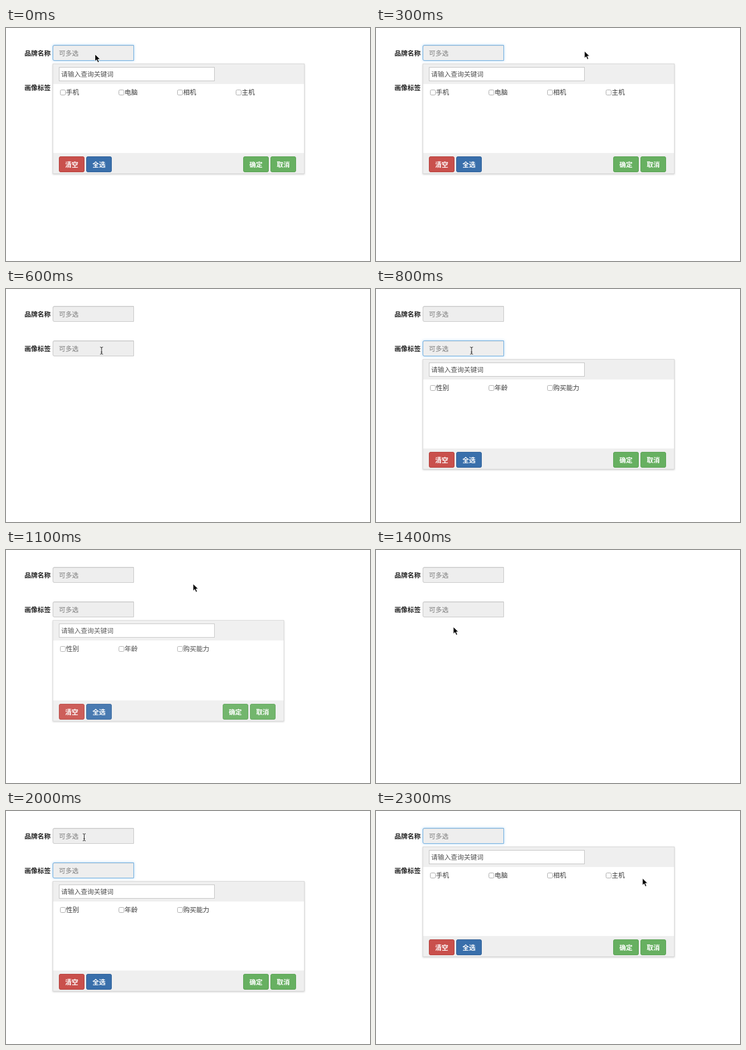
These frames come from a looping animation (640 by 412 pixels, 2.4 s). An HTML page:

```html
<!DOCTYPE html>
<html lang="zh-CN">
<head>
<meta charset="utf-8">
<style>
* { box-sizing: border-box; }
html, body { margin: 0; width: 100%; height: 100%; overflow: hidden; background: #fff; }
body { position: relative; font: 11.5px/28px "Noto Sans CJK SC", "Noto Sans CJK", sans-serif; color: #383838; white-space: nowrap; }
.label, .field, .panel, .head, .foot, .search, .btn, svg { position: absolute; }
.label { left: 32.5px; color: #222; font-weight: bold; }
.field { left: 82px; width: 143px; height: 28px; padding-left: 10px; line-height: 26px; color: #7e7e7e; font-weight: 500;
  background: #eee; border: 1px solid #c8c8c8; border-radius: 3px 0 0 3px; box-shadow: inset 0 1px 1px rgba(0,0,0,.075); }
.field.focus { border-color: #70aee0; box-shadow: inset 0 1px 1px rgba(0,0,0,.075), 0 0 4px rgba(102,175,233,.5); }
.panel { left: 82px; overflow: hidden; background: #fff; border: 1px solid #d9d9d9; box-shadow: 0 1px 3px rgba(0,0,0,.2); }
.head { top: 0; left: 0; right: 0; height: 34.5px; background: #efefef; }
.foot { bottom: 0; left: 0; right: 0; height: 36px; background: #efefef; }
.search { left: 10px; top: 5px; width: 274px; height: 25px; padding-left: 3px; line-height: 23px; color: #525252; background: #fff; border: 1px solid #c4c4c4; }
.list { display: flex; flex-wrap: wrap; padding: 33px 0 0 12px; line-height: 33px; }
.item { flex: none; width: 103px; height: 33px; display: flex; align-items: center; }
.item i { width: 10px; height: 10px; margin-right: .5px; border: 1px solid #aaa; border-radius: 2.5px; background: #fff; }
.btn { bottom: 2px; width: 45px; height: 28px; line-height: 26px; text-align: center; color: #fff; font-weight: bold; border: 1px solid; border-radius: 3px; }
.red { background: #c9504c; border-color: #b5403c; }
.blue { background: #396fab; border-color: #2f6098; }
.green { background: #67b061; border-color: #5aa254; }
svg { left: 0; top: 0; overflow: visible; }
</style>
</head>
<body>
<script>
const LOOP = 2400, STEP = 100, WIDTH = 443, HEIGHT = 195, CLOSE = 200;

// open: spans of [from, to, closing time]
const groups = [
  { top: 30, label: '品牌名称', items: ['手机', '电脑', '相机', '主机'], open: [[0, 344, CLOSE], [2100, LOOP, 0]] },
  { top: 91, label: '画像标签', items: ['性别', '年龄', '购买能力'], open: [[800, 1063, CLOSE], [1600, 2100, 0]] }
];

// time, x, y, text cursor
const path = [
  [0, 156.5, 46.5, 0], [300, 366.5, 41, 0], [400, 366.5, 41, 0], [600, 168, 109, 1], [800, 168, 109, 1],
  [900, 225, 92, 0], [1000, 329, 60, 0], [1200, 329, 60, 0], [1400, 136, 136, 0],
  [1500, 137, 109, 1], [1800, 137, 109, 1], [1900, 137, 75, 0], [2000, 137.5, 46.5, 1],
  [2100, 137.5, 46.5, 1], [2200, 300, 80, 0], [2300, 468.5, 119, 0], [LOOP, 468.5, 119, 0]
];

const add = html => {
  document.body.insertAdjacentHTML('beforeend', html);
  return document.body.lastElementChild;
};

for (const g of groups) {
  add(`<div class="label" style="top:${g.top - .5}px">${g.label}</div>`);
  g.field = add(`<div class="field" style="top:${g.top - .3}px">可多选</div>`);
}
for (const g of groups) {
  g.panel = add(`<div class="panel" style="top:${g.top + 33.3}px">
    <div class="list">${g.items.map(s => `<div class="item"><i></i>${s}</div>`).join('')}</div>
    <div class="head"><div class="search">请输入查询关键词</div></div>
    <div class="foot">
      <div class="btn red" style="left:10px">清空</div><div class="btn blue" style="left:58px">全选</div>
      <div class="btn green" style="right:62px">确定</div><div class="btn green" style="right:14px">取消</div>
    </div></div>`);
}
const cursor = add(`<svg width="1" height="1">
  <path d="M0 0V12.3L2.9 9.6L5 14.4L7.2 13.5L5.1 8.8H9Z" fill="#000" stroke="#fff" stroke-width=".8"/>
  <path d="M-2.5 -6.3Q0 -6.3 0 -4.8Q0 -6.3 2.5 -6.3M0 -5V5M-2.5 6.3Q0 6.3 0 4.8Q0 6.3 2.5 6.3M-1.3 2.5H1.3" fill="none" stroke="#222"/>
</svg>`);
const [arrow, beam] = cursor.children;

// Remaining size of a panel, with a cosine ease while it closes.
function openness(spans, t) {
  for (const [from, to, fade] of spans) {
    if (t >= from && t < to) return 1;
    if (t >= to && t < to + fade) return .5 + Math.cos(Math.PI * (t - to) / fade) / 2;
  }
  return 0;
}

function draw(t) {
  for (const { field, panel, open } of groups) {
    const k = openness(open, t);
    field.classList.toggle('focus', k === 1);
    panel.style.display = k ? '' : 'none';
    panel.style.width = WIDTH * k + 'px';
    panel.style.height = HEIGHT * k + 'px';
    panel.style.opacity = k;
  }
  const i = path.findIndex(p => p[0] > t);
  const a = path[i - 1], b = path[i], u = (t - a[0]) / (b[0] - a[0]);
  const mix = n => a[n] + (b[n] - a[n]) * u;
  cursor.style.transform = `translate(${mix(1)}px,${mix(2)}px)`;
  arrow.style.display = a[3] ? 'none' : '';
  beam.style.display = a[3] ? '' : 'none';
}

const start = performance.now();
function tick() {
  const t = (performance.now() - start) % LOOP;
  draw(Math.floor(t / STEP) * STEP);
  requestAnimationFrame(tick);
}
tick();
</script>
</body>
</html>
```
